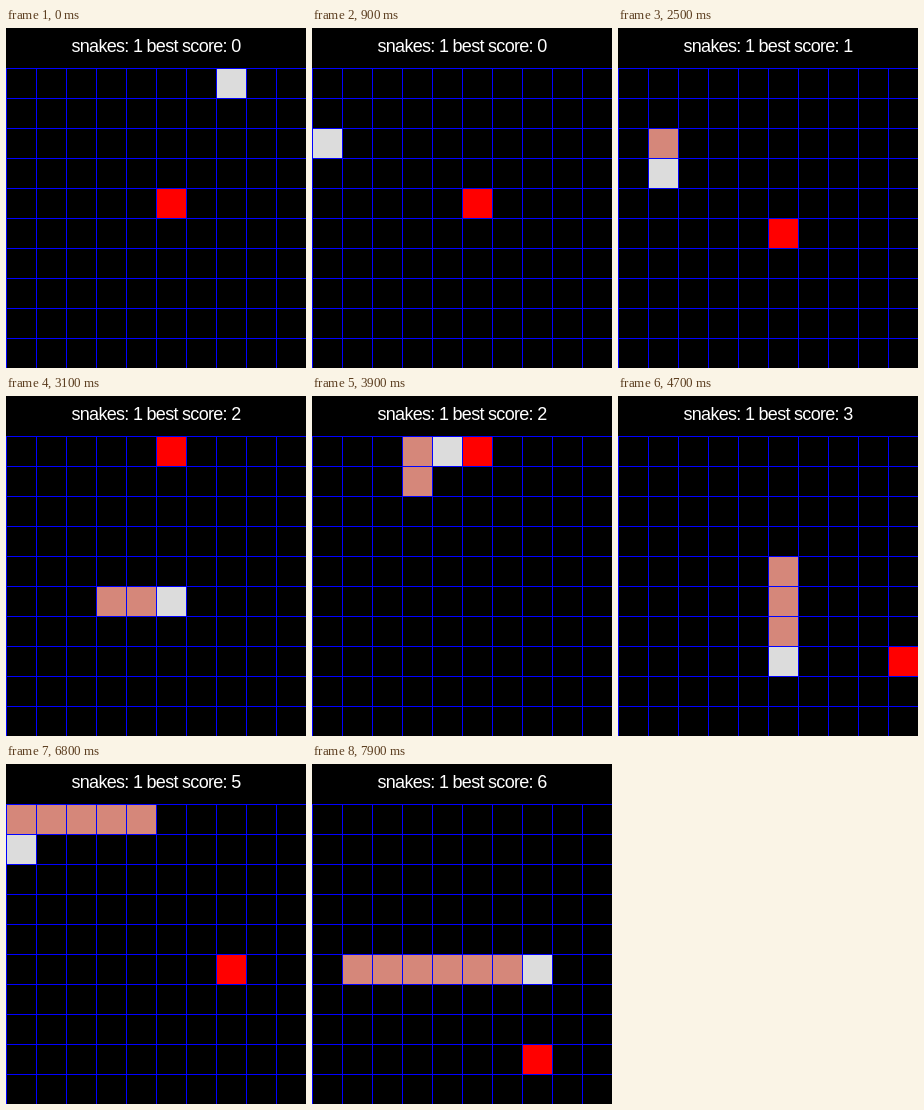
Recreate the animation shown at these times as an HTML page. Size 300x340 px, loop 8000 ms.

```html
<!DOCTYPE html>
<html lang="en">
<head>
<meta charset="utf-8">
<title>Snake</title>
<style>
  html, body { margin: 0; width: 100%; height: 100%; overflow: hidden; background: #000; }
  svg { display: block; width: 300px; height: 340px; }
  text { font: 18px "Liberation Sans", Arial, sans-serif; letter-spacing: -0.7px; fill: #fff; white-space: pre; }
</style>
</head>
<body>
<svg viewBox="0 0 300 340">
  <rect width="300" height="340" fill="#000"/>
  <text id="label" x="65.5" y="23.5"></text>
  <path id="grid" fill="#00f"/>
  <g id="cells" shape-rendering="crispEdges"></g>
</svg>
<script>
const STEP_MS = 100, CELL = 30, TOP = 40, SIZE = 10;
const HEAD = '#dcdcdc', BODY = '#d5877a', FOOD = '#f00';
const ROUTE = 'L7 D4 R5 U3 L4 D4 R4 U3 L2 U2 R2 D7 R4 U1 L1 U6 L8 D5 R7';
const FOODS = [[5, 4], [5, 5], [5, 0], [9, 7], [8, 1], [7, 5], [7, 8]];
const DIRS = { L: [-1, 0], R: [1, 0], U: [0, -1], D: [0, 1] };

const label = document.getElementById('label');
const cells = document.getElementById('cells');

function walk(start, route) {
  const trail = [start];
  for (const leg of route.split(' ')) {
    const [dx, dy] = DIRS[leg[0]];
    for (let n = +leg.slice(1); n > 0; n--) {
      const [x, y] = trail[trail.length - 1];
      trail.push([x + dx, y + dy]);
    }
  }
  return trail;
}

const trail = walk([7, 0], ROUTE);

// Score after each step: the snake eats the foods in order.
let eaten = 0;
const scores = trail.map(([x, y]) => {
  const [fx, fy] = FOODS[eaten];
  if (x === fx && y === fy) eaten++;
  return eaten;
});

let lines = '';
for (let i = 0; i < SIZE; i++) {
  lines += `M${i * CELL} ${TOP}h1v300h-1zM0 ${TOP + i * CELL}h300v1h-300z`;
}
document.getElementById('grid').setAttribute('d', lines);

const square = ([x, y], color) =>
  `<rect x="${x * CELL + 1}" y="${TOP + y * CELL + 1}" width="${CELL - 1}" height="${CELL - 1}" fill="${color}"/>`;

function draw(step) {
  const score = scores[step];
  const body = trail.slice(Math.max(0, step - score), step);
  label.textContent = `snakes: 1 best score: ${score}`;
  cells.innerHTML = square(FOODS[score], FOOD)
    + body.map(cell => square(cell, BODY)).join('')
    + square(trail[step], HEAD);
}

let shown = -1;
const startTime = performance.now();
function tick() {
  const elapsed = performance.now() - startTime;
  const step = Math.floor(elapsed / STEP_MS) % trail.length;
  if (step !== shown) draw(shown = step);
  requestAnimationFrame(tick);
}
tick();
</script>
</body>
</html>
```
